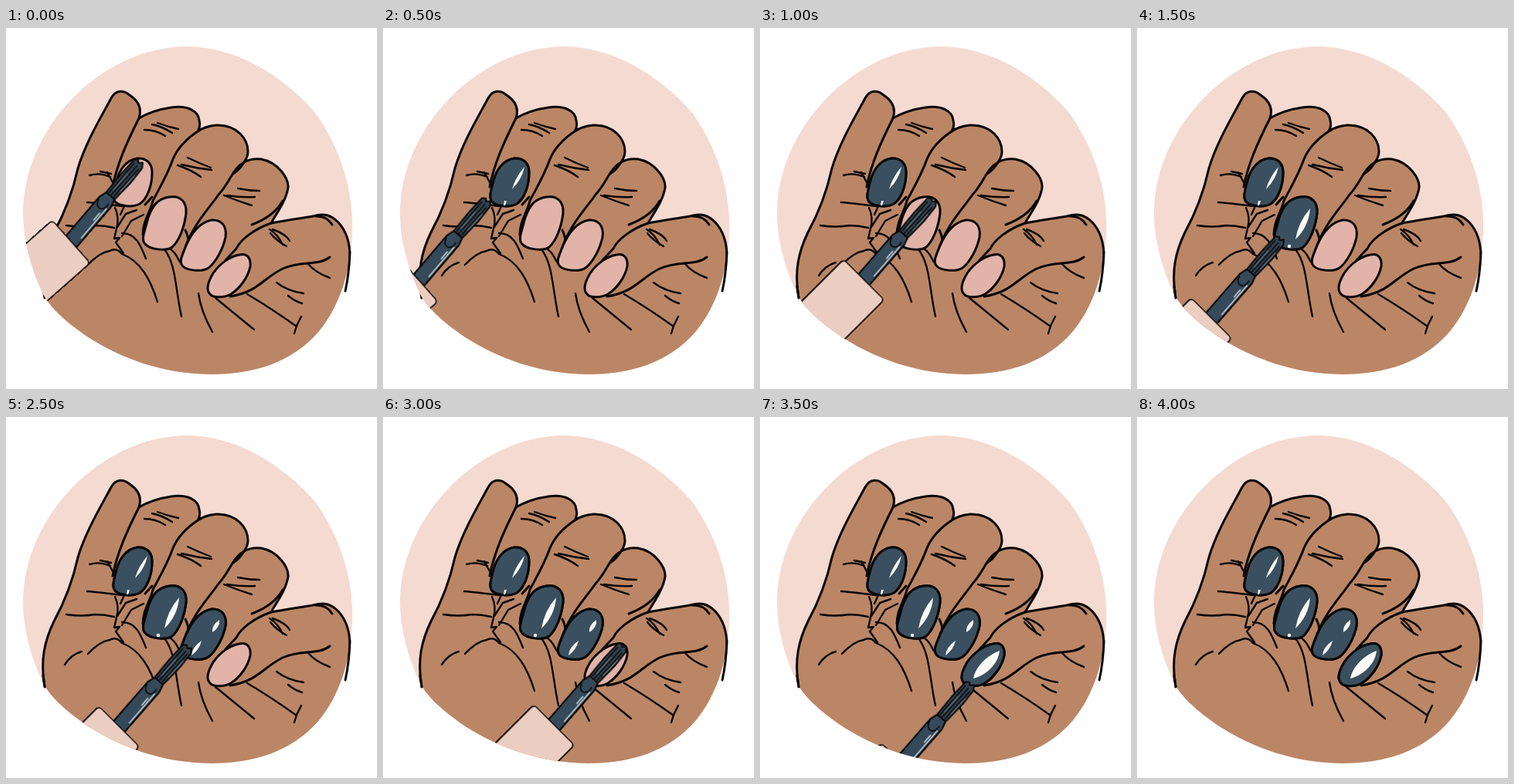
Recreate the animation shown at these times as an HTML page without scripts. Size 480 by 468 pixels, loop 4.5 s.

```html
<!DOCTYPE html>
<html lang="en">
<head>
<meta charset="utf-8">
<title>Nail painting</title>
<style>
  html, body { margin: 0; width: 100%; height: 100%; overflow: hidden; background: #fff; }
  svg { display: block; width: 100%; height: 100%; --polish: #e2b4a9; }
  path, rect { stroke-linecap: round; stroke-linejoin: round; }
  .ink { fill: none; stroke: #080605; stroke-width: 3; }
  .thin { stroke-width: 2.4; }
  .nail { fill: var(--polish); stroke: #080605; stroke-width: 3; }
  .shine { fill: #fbfaf6; }

  .wet, .brush, .cap { animation: 4.5s step-end infinite; }
  .wet { --polish: #3a5060; opacity: 0; }
  .w1 { animation-name: w1; }
  .w2 { animation-name: w2; }
  .w3 { animation-name: w3; }
  .w4 { animation-name: w4; }
  @keyframes w1 { 11.11%, 100% { opacity: 1; } }
  @keyframes w2 { 33.33%, 100% { opacity: 1; } }
  @keyframes w3 { 55.55%, 100% { opacity: 1; } }
  @keyframes w4 { 77.77%, 100% { opacity: 1; } }

  /* dab on a nail, then pull away from it */
  .brush { animation-name: dab; }
  @keyframes dab {
    0%     { transform: translate(174px, 172px) rotate(40.5deg); }
    11.11% { transform: translate(136px, 222px) rotate(40.5deg); }
    22.22% { transform: translate(225px, 222px) rotate(41deg); }
    33.33% { transform: translate(187px, 272px) rotate(41deg); }
    44.44% { transform: translate(275px, 247px) rotate(41deg); }
    55.55% { transform: translate(237px, 297px) rotate(41deg); }
    66.66% { transform: translate(312px, 295px) rotate(41deg); }
    77.77% { transform: translate(274px, 345px) rotate(41deg); }
    88.88%, 100% { transform: translate(-400px, 900px); }
  }
  .cap { transform-origin: 0 138px; animation-name: tilt; }
  @keyframes tilt {
    0% { transform: rotate(8deg); }
    22.22%, 100% { transform: rotate(4deg); }
  }
</style>
</head>
<body>
<svg viewBox="0 0 480 468">
  <defs>
    <path id="blob" d="M235 24C295 24 357 60 400 110C430 152 447 202 448 252C449 310 432 360 405 393C370 434 320 449 265 449C200 448 150 428 108 402C75 380 55 360 47 343C32 310 22 275 22 240C22 130 123 24 235 24Z"/>
    <clipPath id="round"><use href="#blob"/></clipPath>
    <path id="n1" class="nail" d="M170 169C180 168 189 174 189 187C189 206 182 222 173 228C164 233 148 231 142 226C136 221 140 210 143 198C147 183 156 171 170 169Z"/>
    <path id="n2" class="nail" d="M212 219C226 217 234 226 233 240C231 258 224 276 215 284C207 290 186 287 180 280C174 274 180 262 184 246C189 231 196 221 212 219Z"/>
    <path id="n3" class="nail" d="M266 249C279 248 286 257 284 271C281 286 272 303 262 311C253 317 234 314 229 309C223 303 228 295 233 282C240 266 250 252 266 249Z"/>
    <path id="n4" class="nail" d="M302 294C313 291 317 300 316 309C313 324 302 338 291 345C282 350 268 350 264 345C258 339 262 328 268 318C277 305 290 296 302 294Z"/>
  </defs>

  <use href="#blob" fill="#f5dad1"/>

  <g clip-path="url(#round)">
    <path class="ink" style="fill:#bb8666" d="M0 468L50 350C44 315 50 290 62 265C80 232 88 205 93 182C103 148 125 112 136 91C142 80 152 80 160 87C172 95 176 105 172 117C184 110 200 105 214 103C236 100 249 108 250 120Q252 128 248 134C255 129 262 127 272 126C300 125 313 145 313 160Q313 167 308 174C315 170 322 169 330 170C352 174 366 195 365 207C362 225 350 240 343 253C365 249 380 247 397 244C412 240 420 242 430 252C442 265 445 280 445 297Q444 320 439 342L480 468Z"/>

    <!-- finger edges -->
    <path class="ink" d="M172 117C157 147 144 175 138 206M248 134C230 146 221 158 216 170C209 190 200 205 190 224C187 238 177 250 177 268M308 174Q302 184 294 189M308 174C293 182 290 200 275 216C262 235 240 257 230 290M343 253C320 261 303 275 298 286L284 301M358 224Q347 244 318 255M400 244Q415 243 422 255M290 348C325 343 333 324 358 312C382 301 404 309 419 297M180 229L189 219M232 262Q237 272 236 282"/>

    <!-- palm lines -->
    <path class="ink thin" d="M76 321Q84 308 98 304M106 307Q121 291 134 289Q143 284 150 293C174 302 187 326 196 355M105 226Q120 227 150 231M78 256Q98 259 115 256Q128 256 140 259M141 233Q147 246 143 260L140 273L147 272L142 278L152 292M148 242L153 231L160 228M144 258L155 241L169 236M150 266C168 266 174 281 181 299M150 270L162 250L178 242M205 287C220 306 219 338 227 374M212 286Q218 290 222 298Q226 308 238 313M249 344Q252 367 267 394M271 350Q288 364 321 391M312 345Q344 364 376 387M382 374L376 386L373 396M350 330Q364 341 385 344M365 347Q373 354 383 357M390 305Q400 317 419 324"/>

    <!-- creases -->
    <path class="ink thin" d="M108 191Q121 187 135 193M122 186L136 189M131 187L138 200M179 132Q194 132 206 140M189 125Q203 128 215 136M196 123Q209 128 223 131M222 178Q240 184 252 193M227 177Q247 182 266 184M235 168Q249 175 265 181M282 217Q299 224 318 230M286 217Q305 220 322 219M300 208Q314 211 328 211M341 261Q352 268 358 281M345 261Q362 267 367 276M342 266Q350 276 363 283"/>
  </g>
  <path class="ink" d="M445 290Q444 318 439 341M48 335L50 350"/>

  <use href="#n1"/><use href="#n2"/><use href="#n3"/><use href="#n4"/>

  <g class="wet w1">
    <use href="#n1"/>
    <path class="shine" d="M183 180Q180 196 167 209Q171 194 183 180ZM157 224L160 224L158 230L156 230Z"/>
  </g>
  <g class="wet w2">
    <use href="#n2"/>
    <path class="shine" d="M224 234Q222 258 205 274Q209 251 224 234Z"/>
    <circle class="shine" cx="197" cy="283" r="2.2"/>
  </g>
  <g class="wet w3">
    <use href="#n3"/>
    <path class="shine" d="M276 263Q277 273 267 279Q266 270 276 263ZM253 290Q250 302 240 309Q241 298 253 290Z"/>
  </g>
  <g class="wet w4">
    <use href="#n4"/>
    <path class="shine" d="M310 303C308 321 292 335 276 339C279 323 294 309 310 303Z"/>
  </g>

  <g clip-path="url(#round)">
    <g class="brush">
      <path d="M-7 64L-8 30L-7 4L-3 1L0 4L4 0L8 6L9 30L7 64Z" fill="#30424f" stroke="#080605" stroke-width="2"/>
      <path class="ink" style="stroke-width:1.5" d="M-4 58L-4 8M0 60L1 8M4 58L5 10"/>
      <path d="M-2 52L-2 24M6 48L7 20" stroke="#8c9ba3" stroke-width=".8"/>
      <path d="M-7 60L7 60L10 70L10 140L-10 140L-10 70Z" fill="#34495a" stroke="#080605" stroke-width="2.2"/>
      <path class="ink" style="stroke-width:1.6" d="M-9 73Q-6 83 1 81Q6 79 5 70"/>
      <path d="M7 76L7 126M4 86L4 98" fill="none" stroke="#dfe5e6" stroke-width="1.4"/>
      <rect class="cap" x="-37" y="138" width="74" height="200" rx="5" fill="#eccdc1" stroke="#080605" stroke-width="1.7"/>
    </g>
  </g>
</svg>
</body>
</html>
```
